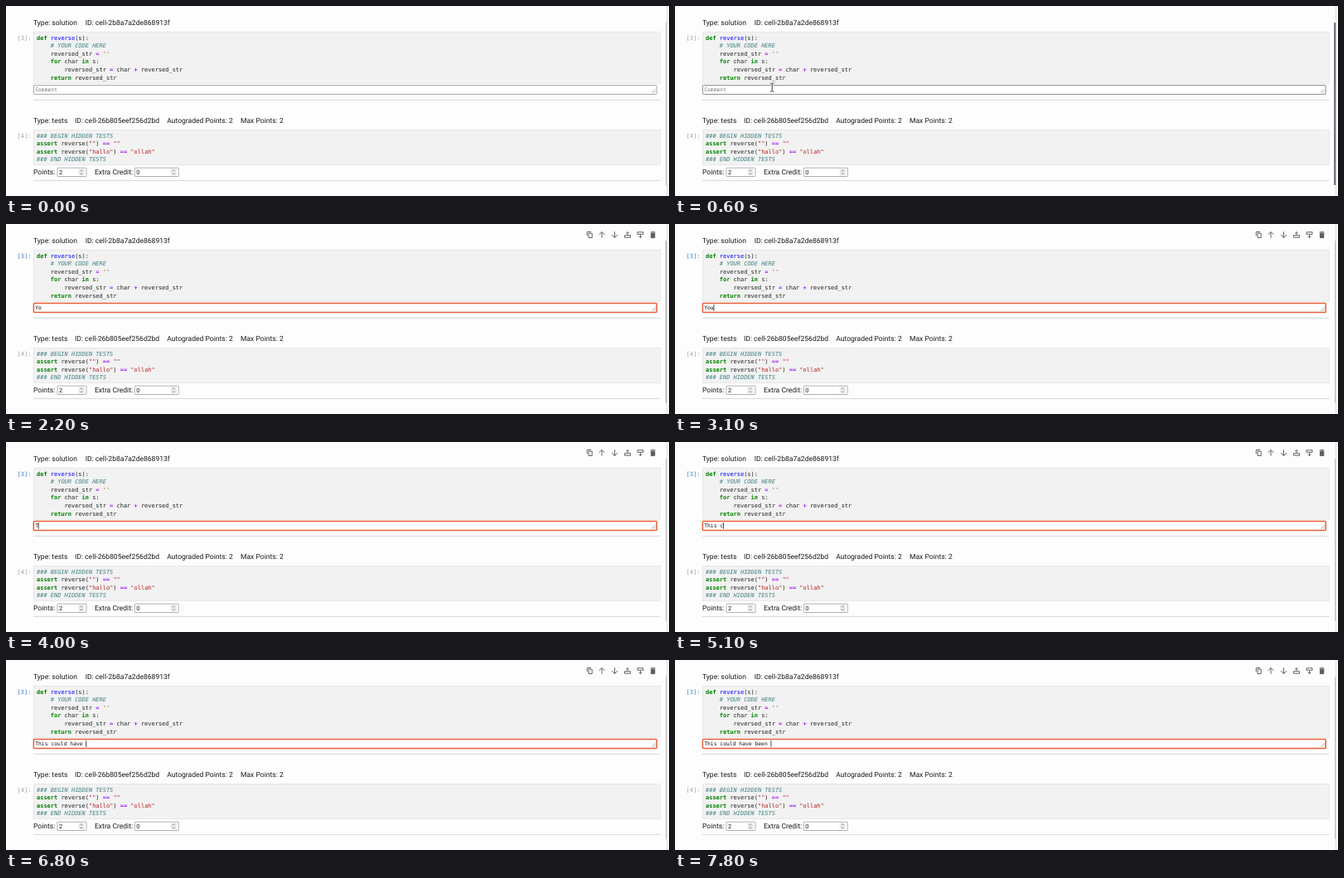
These frames come from a looping animation (800 px wide and 229 px high, 8000 ms). An HTML page:

```html
<!DOCTYPE html>
<html lang="en">
<head>
<meta charset="utf-8">
<title>Grading a notebook</title>
<style>
  html, body { margin: 0; width: 100%; height: 100%; overflow: hidden; background: #fefdfe; }
  svg { display: block; }
  text { white-space: pre; text-rendering: geometricPrecision; }
  .ui { font: 8.55px Roboto, sans-serif; fill: #1a1a1a; }
  .num { font: 7.3px Roboto, sans-serif; fill: #1a1a1a; }
  .code { font: 6.98px "DejaVu Sans Mono", monospace; fill: #212121; }
  .note { font: 6.37px "DejaVu Sans Mono", monospace; fill: #111; }
  .prompt { fill: #a3a3a3; }
  .prompt.on { fill: #307fc1; }
  .k { fill: #008000; font-weight: bold; }
  .f { fill: #0000ff; }
  .c { fill: #408080; font-style: italic; }
  .o { fill: #aa22ff; font-weight: bold; }
  .s { fill: #ba2121; }
  .box { fill: #f2f2f2; stroke: #dedede; stroke-width: .6; }
  .rule { stroke: #cfcfd2; stroke-width: .8; }
  .field { fill: #fff; stroke: #8f8f9d; stroke-width: .7; }
  .icon { fill: none; stroke: #5c5c5c; stroke-width: .95; }
</style>
</head>
<body>
<svg id="stage" width="800" height="229" viewBox="0 0 800 229">
  <rect width="800" height="229" fill="#fefdfe"/>
  <path d="M797.6 0V229" stroke="#cfcfd2" stroke-width=".8"/>
  <rect id="thumb" y="20" height="196" rx=".8"/>

  <g id="tools" class="icon">
    <path d="M701.2 14.2V9.5H706M703 11.2H707.2V16.5H703Z"/>
    <path d="M719 16.7V9.6M715.6 12.9L719 9.5L722.4 12.9"/>
    <path d="M734.5 9.3V16.4M731.1 13.1L734.5 16.5L737.9 13.1"/>
    <path d="M746.5 13.7H753.5V16.2H746.5ZM750 13V9.7M748.2 11.3L750 9.5L751.8 11.3"/>
    <path d="M762 9.8H769V12.3H762ZM765.5 13V16.4M763.7 14.8L765.5 16.6L767.3 14.8"/>
    <path d="M778.4 11.2H782.8V16.6H778.4ZM777.6 10H783.6M779.5 9.3H781.7" fill="#5c5c5c"/>
  </g>

  <g id="page"></g>

  <rect id="area" x="33.4" y="95.6" width="751.8" height="10.8" rx=".8"/>
  <path d="M779.5 104.6L783.6 100.5M781.7 104.6L783.6 102.7" stroke="#777" stroke-width=".6"/>
  <text id="note" class="note" x="35.2" y="103.3"></text>
  <path id="caret" stroke="#111" stroke-width=".8"/>
  <g id="beam" fill="none">
    <path d="M-2.3 -5.2H2.3M0 -5.2V5M-2.3 5H2.3" stroke="#fff" stroke-width="2"/>
    <path d="M-2.3 -5.2Q0 -5.2 0 -4.4V4.2Q0 5 -2.3 5M2.3 -5.2Q0 -5.2 0 -4.4M0 4.2Q0 5 2.3 5" stroke="#333" stroke-width=".95"/>
  </g>
</svg>
<script>
const LOOP = 8000;
const NOTE_X = 35.2, CHAR_W = 3.835;
const $ = id => document.getElementById(id);
const set = (el, attrs) => { for (const k in attrs) el.setAttribute(k, attrs[k]); };

// ---- static page ----
const text = (cls, x, y, s, id = "") => `<text class="${cls}" id="${id}" x="${x}" y="${y}">${s}</text>`;
const rule = y => `<path class="rule" d="M33 ${y}H789.5"/>`;
const box = (y, h) => `<rect class="box" x="33.3" y="${y}" width="756" height="${h}"/>`;

// Marks such as {k:def} become coloured spans.
const paint = s => s.replace(/\{(\w):(.*?)\}/g, '<tspan class="$1">$2</tspan>');
const code = (y, lines) => lines.map((s, i) => text("code", 37, y + i * 9.62, paint(s))).join("");

function field(x, w, value) {
  const r = x + w - 6;
  return `<rect class="field" x="${x}" y="195.1" width="${w}" height="10.4" rx=".8"/>` +
    text("num", x + 2, 202.9, value) +
    `<rect x="${r - 3.6}" y="196.2" width="7.2" height="8.2" fill="#ececee"/>` +
    `<path d="M${r - 1.5} 199.2l1.5 -1.5l1.5 1.5M${r - 1.5} 201.5l1.5 1.5l1.5 -1.5" fill="none" stroke="#666" stroke-width=".7"/>`;
}

$("page").innerHTML = [
  text("ui", 33, 22.8, "Type: solution"),
  text("ui", 95.7, 22.8, "ID: cell-2b8a7a2de868913f"),
  box(31.2, 62),
  text("code prompt", 13.6, 40.6, "[3]:", "prompt"),
  code(40.6, [
    "{k:def} {f:reverse}(s):",
    "    {c:# YOUR CODE HERE}",
    "    reversed_str {o:=} {s:''}",
    "    {k:for} char {k:in} s:",
    "        reversed_str {o:=} char {o:+} reversed_str",
    "    {k:return} reversed_str"
  ]),
  rule(113.4),
  text("ui", 33, 140.8, "Type: tests"),
  text("ui", 83, 140.8, "ID: cell-26b805eef256d2bd"),
  text("ui", 194.2, 140.8, "Autograded Points: 2"),
  text("ui", 283, 140.8, "Max Points: 2"),
  box(149.3, 42),
  text("code prompt", 13.6, 158.6, "[4]:"),
  code(158.6, [
    "{c:### BEGIN HIDDEN TESTS}",
    '{k:assert} reverse({s:""}) {o:==} {s:""}',
    '{k:assert} reverse({s:"hallo"}) {o:==} {s:"ollah"}',
    "{c:### END HIDDEN TESTS}"
  ]),
  text("ui", 33, 202.9, "Points:"),
  field(62, 35, "2"),
  text("ui", 107, 202.9, "Extra Credit:"),
  field(155.3, 53, "0"),
  rule(210.4)
].join("");

// ---- motion ----
const FIRST = [[1600, "Y"], [2000, "Yo"], [3100, "You"], [3300, "Y"], [3400, ""]];
const SENTENCE = "This could have been ";
const KEYS = [4000, 4200, 4400, 4600, 4700, 5100, 5300, 5500, 5700, 5900, 6100,
              6200, 6300, 6400, 6600, 6800, 7000, 7100, 7300, 7600, 7800];

const clamp = v => Math.max(0, Math.min(1, v));
const span = (t, a, b) => clamp((t - a) / (b - a));
const mix = (a, b, p) => a + (b - a) * p;

function typed(t) {
  if (t >= KEYS[0]) return SENTENCE.slice(0, KEYS.filter(k => k <= t).length);
  return FIRST.reduce((s, [at, v]) => t >= at ? v : s, "");
}

function draw(t) {
  const focus = t >= 800;
  const step = Math.floor(t / 100) * 100;

  const glow = span(step, 0, 400) * (1 - span(step, 1900, 2300));
  const shade = Math.round(mix(196, 112, glow));
  set($("thumb"), {
    x: mix(796, 795.1, glow), width: mix(1.1, 2.2, glow),
    fill: `rgb(${shade},${shade},${shade + 3})`
  });

  $("tools").style.display = focus ? "" : "none";
  $("prompt").classList.toggle("on", focus);
  set($("area"), {
    fill: "#fff",
    stroke: focus ? "#e5603a" : t >= 600 ? "#6c6c78" : "#8f8f9d",
    "stroke-width": focus ? 1.5 : .8
  });

  const s = typed(t);
  $("note").textContent = s || "Comment";
  $("note").style.fill = s ? "#111" : "#777";
  const x = NOTE_X + s.length * CHAR_W + .2;
  set($("caret"), { d: `M${x} 97.2V104.8` });
  $("caret").style.display = focus && !(t >= 2200 && t < 3100) ? "" : "none";

  const p = 1 - (1 - span(step, 100, 600)) ** 2;
  set($("beam"), { transform: `translate(${mix(160, 117.2, p)} ${mix(165, 98.2, p)})` });
  $("beam").style.display = t >= 100 && t < 1600 ? "" : "none";
}

const start = performance.now();
function tick() {
  draw((performance.now() - start) % LOOP);
  requestAnimationFrame(tick);
}
tick();
</script>
</body>
</html>
```
